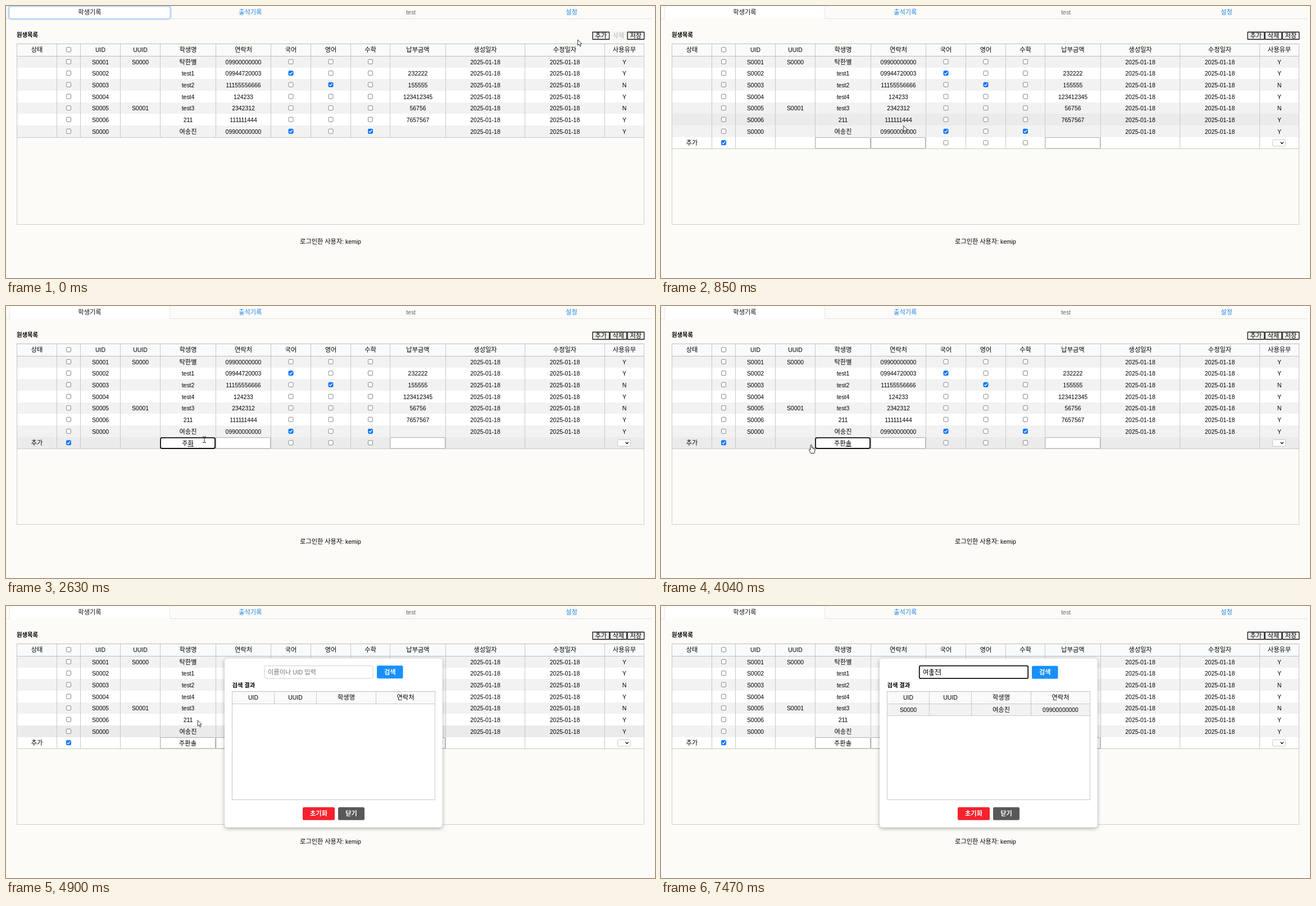
Animation, 1155 px wide and 485 px high, one loop 8 s. Source, as an HTML page with a canvas:

```html
<!DOCTYPE html>
<html lang="ko">
<head>
<meta charset="utf-8">
<style>
html, body { margin: 0; width: 100%; height: 100%; overflow: hidden; background: #fcfbf7; }
canvas { display: block; }
</style>
</head>
<body>
<canvas id="stage" width="1155" height="485"></canvas>
<script>
const ctx = document.getElementById('stage').getContext('2d');
const LOOP = 8000, STEP = 66.2;
const COLS = [19, 90, 132, 203, 274, 373, 471, 542, 613, 683, 782, 923, 1065, 1135];
const HEADS = ['상태', '', 'UID', 'UUID', '학생명', '연락처', '국어', '영어', '수학', '납부금액', '생성일자', '수정일자', '사용유무'];
const DATE = '2025-01-18', PHONE = '09900000000', FOUND = '여송진';
// uid, uuid, name, contact, checked subjects, amount, in use
const STUDENTS = [
  ['S0001', 'S0000', '탁한별', PHONE, '000', '', 'Y'],
  ['S0002', '', 'test1', '09944720003', '100', '232222', 'Y'],
  ['S0003', '', 'test2', '11155556666', '010', '155555', 'N'],
  ['S0004', '', 'test4', '124233', '000', '123412345', 'Y'],
  ['S0005', 'S0001', 'test3', '2342312', '000', '56756', 'N'],
  ['S0006', '', '211', '111111444', '000', '7657567', 'Y'],
  ['S0000', '', FOUND, PHONE, '101', '', 'Y']
];
const T = { click: 315, added: 380, focus: 1310, caretOff: 1840, open: 4310, loaded: 4830, search: 5690, result: 7470 };
const CLICKS = [[315, 450], [1310, 1440], [4170, 4300], [5690, 5755]];
const NAME_KEYS = [[2100, 'ㅈ'], [2240, '주'], [2440, '주ㅎ'], [2510, '주호'], [2630, '주화'], [2770, '주환'],
  [2840, '주환ㅅ'], [2970, '주환소'], [3110, '주환솔']];
const FIND_KEYS = [[6090, 'ㅇ'], [6420, '여'], [6620, '여ㅅ'], [6690, '여소'], [6810, '여송'],
  [6950, '여송ㅈ'], [7010, '여송지'], [7140, FOUND]];
const PATH = [[0, 1017, 60], [120, 1017, 60], [260, 1056, 53], [450, 1056, 53], [654, 577, 182], [720, 537, 194],
  [910, 385, 222], [1110, 356, 238], [1360, 356, 238], [1440, 353, 238], [3620, 353, 238], [4050, 263, 248],
  [4440, 260, 247], [4490, 258, 247], [4650, 258, 247], [5290, 478, 132], [5400, 478, 132], [5610, 482, 118]];

const rowY = i => Math.round(89 + i * 20.65);
const typed = (keys, t) => keys.reduce((text, [at, value]) => t >= at ? value : text, '');

function pointer(t) {
  const i = PATH.findIndex(p => p[0] > t);
  if (i < 0) return PATH[PATH.length - 1].slice(1);
  const [t0, x0, y0] = PATH[Math.max(0, i - 1)], [t1, x1, y1] = PATH[i];
  const u = (t - t0) / (t1 - t0);
  return [x0 + (x1 - x0) * u, y0 + (y1 - y0) * u];
}

function fill(x, y, w, h, color) {
  ctx.fillStyle = color;
  ctx.fillRect(x, y, w, h);
}

function box(x, y, w, h, r, color, line, width = 1) {
  ctx.beginPath();
  ctx.roundRect(x, y, w, h, r);
  if (color) { ctx.fillStyle = color; ctx.fill(); }
  if (line) { ctx.strokeStyle = line; ctx.lineWidth = width; ctx.stroke(); }
}

function frame(x0, y0, x1, y1, color) {
  fill(x0, y0, x1 - x0 + 1, 1, color);
  fill(x0, y1, x1 - x0 + 1, 1, color);
  fill(x0, y0, 1, y1 - y0 + 1, color);
  fill(x1, y0, 1, y1 - y0 + 1, color);
}

// Hangul runs are set slightly larger than Latin ones. Returns the text width.
function text(str, x, cy, { align = 'center', color = '#000', size = 10.45, bold = false } = {}) {
  const runs = (str.match(/[ㄱ-ㅣ가-힣]+|[^ㄱ-ㅣ가-힣]+/g) || []).map(s => {
    const hangul = /[ㄱ-ㅣ가-힣]/.test(s);
    const font = (bold ? 'bold ' : '') + (hangul
      ? size * 1.075 + 'px "Noto Sans CJK KR", "Noto Sans CJK", sans-serif'
      : size + 'px "Liberation Sans", Arial, sans-serif');
    ctx.font = font;
    return { s, font, w: ctx.measureText(s).width };
  });
  const width = runs.reduce((sum, r) => sum + r.w, 0);
  if (align === 'center') x -= width / 2;
  ctx.fillStyle = color;
  for (const r of runs) {
    ctx.font = r.font;
    ctx.fillText(r.s, x, cy + 4);
    x += r.w;
  }
  return width;
}

function checkbox(x, y, on) {
  box(x - 4, y - 4, 8, 8, 1.5, on ? '#0b75ff' : '#fff', on ? '#0b75ff' : '#767676', on ? 1 : 0.9);
  if (!on) return;
  ctx.beginPath();
  ctx.moveTo(x - 2.6, y + 0.2);
  ctx.lineTo(x - 0.7, y + 2);
  ctx.lineTo(x + 2.7, y - 2.2);
  ctx.strokeStyle = '#fff';
  ctx.lineWidth = 1.4;
  ctx.stroke();
}

function underline(x, y, w) { fill(x, y, w, 1, '#222'); }

function drawTabs(t) {
  fill(0, 22, 1150, 1, '#dee2e6');
  if (t < T.click) box(4.8, 0.3, 288.2, 22.9, 4, null, '#c0d8f9', 2.7);
  box(6.5, -0.5, 285, 23, [4, 4, 0, 0], '#fff', '#dee2e6', 0.8);
  fill(7, 22, 284, 1, '#fff');
  if (t < T.click) box(4.8, 0.3, 288.2, 22.9, 4, null, '#c0d8f9', 2.7);
  ['학생기록', '출석기록', 'test', '설정'].forEach((label, i) =>
    text(label, 149 + i * 285.8, 11.3, { color: ['#111', '#1a82f0', '#666', '#1a82f0'][i] }));
}

function drawToolbar(t) {
  text('원생목록', 19, 50.5, { align: 'left', size: 9.6, bold: true });
  ['추가', '삭제', '저장'].forEach((label, i) => {
    const off = i === 1 && t < T.added;
    box(1044 + i * 31, 46.5, 29.7, 13, 0.5, off ? '#f8f7f4' : '#efefef', off ? '#efeeea' : '#111', 1.3);
    text(label, 1058.8 + i * 31, 52.8, { color: off ? '#b5b5b2' : '#000' });
  });
}

function gridRow(cols, y0, y1, color, cells, line = '#c8c8c8') {
  const left = cols[0], right = cols[cols.length - 1], cy = (y0 + y1) / 2;
  fill(left, y0, right - left, y1 - y0, color);
  fill(left, y1, right - left + 1, 1, line);
  cols.forEach(x => fill(x, y0, 1, y1 - y0 + 1, line));
  cells.forEach((cell, i) => {
    const cx = (cols[i] + cols[i + 1] + 1) / 2;
    if (typeof cell === 'boolean') checkbox(cx, cy - 0.2, cell);
    else if (cell) text(cell, cx, cy);
  });
}

function drawNewRow(t) {
  const y = rowY(7);
  const field = i => box(COLS[i] + 0.8, y + 0.6, COLS[i + 1] - COLS[i] - 1.2, 19.4, 1.5, '#fff', '#a9a9a9', 1);
  [4, 5, 9].forEach(field);
  const name = typed(NAME_KEYS, t), focused = t >= T.focus && t < 4170;
  if (focused) box(275, y + 0.8, 97, 19.2, 3, '#fff', '#101010', 1.8);
  const width = text(name, 323.5, y + 10.8);
  if (focused && name) underline(323.5 + width / 2 - 10.4, y + 16, 10.4);
  if (focused && !name && t < T.caretOff) fill(323, y + 5, 1, 11, '#222');

  box(1088.5, y + 4.5, 23, 11.5, 2, '#fff', '#bdbdbd', 0.8);
  ctx.beginPath();
  ctx.moveTo(1102.7, y + 8.8);
  ctx.lineTo(1105.2, y + 11.4);
  ctx.lineTo(1107.7, y + 8.8);
  ctx.strokeStyle = '#111';
  ctx.lineWidth = 1.4;
  ctx.stroke();
}

function drawTable(t, hovered) {
  frame(19, 67, 1135, 389, '#cfcfcb');
  gridRow(COLS, 67, 89, '#f8fafb', HEADS.map((h, i) => i === 1 ? false : h), '#c4c8c8');
  fill(19, 67, 1117, 1, '#bbb');
  const color = i => i === hovered ? '#ebebeb' : i % 2 ? '#fff' : '#f2f2f2';
  STUDENTS.forEach(([uid, uuid, name, contact, subjects, amount, use], i) =>
    gridRow(COLS, rowY(i), rowY(i + 1), color(i),
      ['', false, uid, uuid, name, contact, ...[...subjects].map(s => s === '1'), amount, DATE, DATE, use]));
  fill(19, 89, 1117, 1, '#bdbdbd');
  if (t >= T.added) {
    gridRow(COLS, rowY(7), rowY(8), color(7), ['추가', true, '', '', '', '', false, false, false]);
    drawNewRow(t);
  }
  text('로그인한 사용자: kemip', 577.5, 420);
}

function button(x, y, w, label, color) {
  box(x, y, w, 23, 2.5, color);
  text(label, x + w / 2, y + 11.5, { color: '#fff', bold: true });
}

function drawSearch(t) {
  const loading = t < T.loaded, x = loading ? 449 : 460;
  const value = typed(FIND_KEYS, t), focused = t >= T.search;
  box(x - 0.2, 106.6, 193.4, 22.6, 2.5, '#fff', focused ? '#101010' : '#cfcfcf', focused ? 1.8 : 1);
  if (!value) text('이름이나 UID 입력', x + 6, 118, { align: 'left', color: '#757575' });
  const width = text(value, x + 6, 118.3, { align: 'left' });
  if (value && t < T.result) underline(x + 6 + width - 10.4, 123, 10.4);
  else if (focused) fill(Math.round(x + 6 + width), 112, 1, 12, '#222');
  button(x + 200, value ? 106.7 : 106.2, loading ? 68 : 46.5, loading ? '검색 중...' : '검색', loading ? '#c5d0dc' : '#1890ff');
}

function drawModal(t) {
  ctx.save();
  ctx.shadowColor = 'rgba(0,0,0,.32)';
  ctx.shadowBlur = 7;
  ctx.shadowOffsetY = 2;
  box(389, 93.5, 387.7, 301.3, 5, '#fff');
  ctx.restore();
  drawSearch(t);
  text('검색 결과', 402.5, 141, { align: 'left', size: 9.6, bold: true });
  frame(402, 152, 763, 345, '#c8c8c8');
  const cols = [402, 477, 552, 658, 763];
  gridRow(cols, 152, 174, '#f8fafb', ['UID', 'UUID', '학생명', '연락처']);
  fill(402, 152, 362, 1, '#bdbdbd');
  if (t >= T.result) gridRow(cols, 175, 195, '#f2f2f2', ['S0000', '', FOUND, PHONE]);
  button(528, 358.8, 57, '초기화', '#f5222d');
  button(591, 358.8, 47, '닫기', '#595959');
}

function poly(points, x, y) {
  ctx.beginPath();
  points.forEach(([dx, dy]) => ctx.lineTo(x + dx, y + dy));
  ctx.closePath();
  ctx.fillStyle = '#fff';
  ctx.fill();
  ctx.strokeStyle = '#222';
  ctx.lineWidth = 0.9;
  ctx.stroke();
}

function drawHand(x, y) {
  ctx.beginPath();
  ctx.moveTo(x - 1.2, y + 9);
  ctx.lineTo(x - 1.2, y + 0.8);
  ctx.quadraticCurveTo(x, y - 1, x + 1.2, y + 0.8);
  ctx.lineTo(x + 1.2, y + 5);
  ctx.lineTo(x + 6, y + 6);
  ctx.quadraticCurveTo(x + 7.2, y + 6.5, x + 7, y + 9);
  ctx.lineTo(x + 5.6, y + 15);
  ctx.lineTo(x - 0.6, y + 15);
  ctx.lineTo(x - 4, y + 9);
  ctx.quadraticCurveTo(x - 3.5, y + 7, x - 1.2, y + 9);
  ctx.closePath();
  ctx.fillStyle = '#fff';
  ctx.fill();
  ctx.strokeStyle = '#222';
  ctx.lineWidth = 1;
  ctx.stroke();
  for (const dx of [3, 5]) fill(x + dx - 0.4, y + 5.6, 0.8, 2.6, '#444');
}

function drawIBeam(x, y) {
  fill(x - 0.5, y - 5, 1, 11, '#222');
  for (const dy of [-5.5, 5]) {
    fill(x - 3, y + dy, 2.4, 1, '#222');
    fill(x + 0.6, y + dy, 2.4, 1, '#222');
  }
}

function drawPointer(t, x, y) {
  if (CLICKS.some(([from, to]) => t >= from && t < to)) {
    ctx.beginPath();
    ctx.arc(x, y, 6.3, 0, 7);
    ctx.fillStyle = 'rgba(250,240,60,.85)';
    ctx.fill();
  }
  const modal = t >= T.open && x > 389;
  const onRow = !modal && t >= T.added && y > 234 && y < 255;
  const onField = modal ? x > 460 && x < 653 && y > 106 && y < 130 : onRow && x > 274 && x < 471;
  if (onField) drawIBeam(x, y);
  else if (onRow && x > 203 && x <= 274) drawHand(x, y);
  else poly([[0, 0], [0, 10.2], [2.3, 8.2], [4, 12], [5.7, 11.2], [4.1, 7.6], [7.1, 7.3]], x + 0.5, y);
}

function hoveredRow(t, [x, y]) {
  if ((t >= T.open && x > 389) || x < 19 || x > 1135) return -1;
  return Math.floor((y - 89) / 20.65);
}

function draw(t) {
  const moved = t < 113 ? 0 : 124 + STEP * Math.floor((t - 113) / STEP);
  const [x, y] = pointer(moved);
  fill(0, 0, 1155, 485, '#fcfbf7');
  drawTabs(t);
  drawToolbar(t);
  drawTable(t, hoveredRow(t, pointer(Math.max(0, moved - STEP))));
  if (t >= T.open) drawModal(t);
  drawPointer(t, x, y);
}

const start = performance.now();
function tick() {
  draw((performance.now() - start) % LOOP);
  requestAnimationFrame(tick);
}
tick();
</script>
</body>
</html>
```
